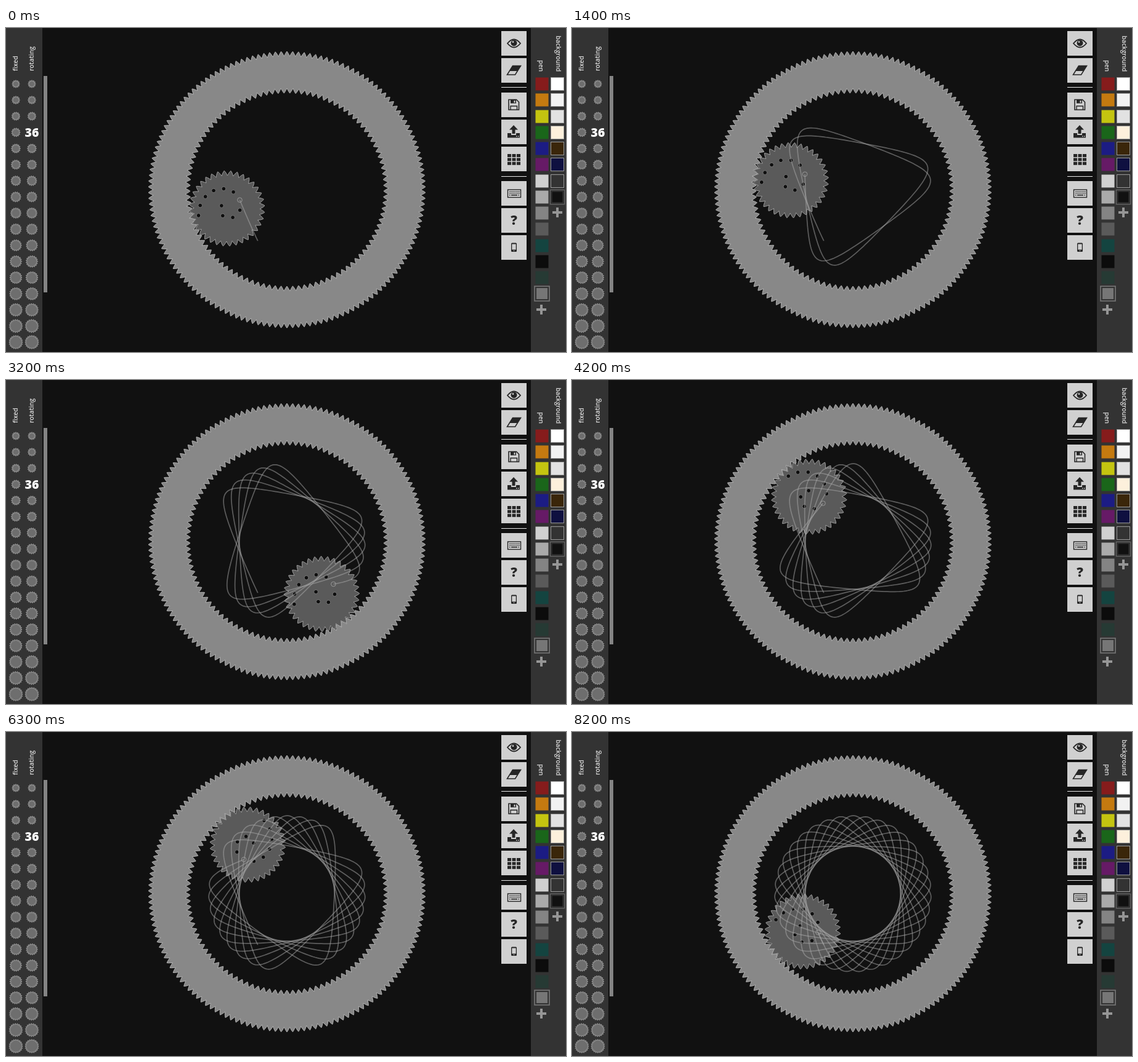
An HTML page with a canvas that plays this animation: 909 px wide and 527 px high, repeating every 8300 ms.

```html
<!DOCTYPE html>
<html>
<head>
<meta charset="utf-8">
<style>
html, body { margin: 0; height: 100%; overflow: hidden; background: #111; }
canvas { display: block; }
</style>
</head>
<body>
<canvas id="stage" width="909" height="527"></canvas>
<script>
const ctx = document.getElementById('stage').getContext('2d');
const TAU = Math.PI * 2, DEG = Math.PI / 180;
const CX = 456, CY = 263;
const OUTER_TEETH = 150, INNER_TEETH = 105, GEAR_TEETH = 36;
const ORBIT = 102, HOLE_MIN = 9.9, HOLE_STEP = 3.76, PEN_HOLE = 4;
const PEN_RADIUS = HOLE_MIN + HOLE_STEP * PEN_HOLE;
const PEAK = 218.8, START = 133.6;
const PETAL = 360 * GEAR_TEETH / INNER_TEETH;
const ROW = 26.25;
const STEP_MS = 100, STEPS = 83;

// [step, orbit angle in degrees]; the wheel's speed varies slightly
const KEYS = [[0, 162.6], [7, 543.1], [21, 1274.2], [42, 2385.8],
              [54, 3000.2], [73, 3995], [82, 4463]];

function orbitAngle(step) {
  const i = KEYS.findIndex(k => k[0] >= step);
  if (i === 0) return KEYS[0][1];
  const [s0, a0] = KEYS[i - 1], [s1, a1] = KEYS[i];
  return a0 + (a1 - a0) * (step - s0) / (s1 - s0);
}

const spin = angle => angle - (angle - PEAK) * INNER_TEETH / GEAR_TEETH;

function polar(x, y, r, angle) {
  return [x + r * Math.cos(angle), y + r * Math.sin(angle)];
}
const gearCenter = angle => polar(CX, CY, ORBIT, angle * DEG);
const penPoint = angle => polar(...gearCenter(angle), PEN_RADIUS, spin(angle) * DEG);

function rect(x, y, w, h, color) {
  ctx.fillStyle = color;
  ctx.fillRect(x, y, w, h);
}

function frame(x, y, w, h, color, width = 1) {
  ctx.strokeStyle = color;
  ctx.lineWidth = width;
  ctx.strokeRect(x, y, w, h);
}

function shape(d, fill, stroke, width = 1) {
  const path = new Path2D(d);
  if (fill) { ctx.fillStyle = fill; ctx.fill(path, 'evenodd'); }
  if (stroke) { ctx.strokeStyle = stroke; ctx.lineWidth = width; ctx.stroke(path); }
}

function disc(x, y, r, fill, stroke) {
  ctx.beginPath();
  ctx.arc(x, y, r, 0, TAU);
  if (fill) { ctx.fillStyle = fill; ctx.fill(); }
  if (stroke) { ctx.strokeStyle = stroke; ctx.lineWidth = 1; ctx.stroke(); }
}

function toothedPath(x, y, valley, tip, teeth, rotation) {
  const samples = 8, path = new Path2D();
  for (let i = 0; i < teeth * samples; i++) {
    const u = Math.abs((i % samples) / samples * 2 - 1);
    const r = tip + (valley - tip) * u ** 1.2;
    path.lineTo(...polar(x, y, r, rotation + (i / samples - 0.5) * TAU / teeth));
  }
  path.closePath();
  return path;
}

function paint(path, fill, stroke, width) {
  ctx.fillStyle = fill;
  ctx.fill(path, 'evenodd');
  ctx.strokeStyle = stroke;
  ctx.lineWidth = width;
  ctx.stroke(path);
}

function text(label, x, y, rotation, font, color, align) {
  ctx.save();
  ctx.translate(x, y);
  ctx.rotate(rotation);
  ctx.font = font + ' "Open Sans", sans-serif';
  ctx.fillStyle = color;
  ctx.textAlign = align;
  ctx.fillText(label, 0, 0);
  ctx.restore();
}

function plus(x, y) {
  rect(x - 8, y - 2, 16, 4, '#969696');
  rect(x - 2, y - 8, 4, 16, '#969696');
}

function drawGearList() {
  rect(0, 0, 59, 527, '#333');
  text('fixed', 18.5, 70, -Math.PI / 2, '600 10.4px', '#ddd', 'left');
  text('rotating', 45, 70, -Math.PI / 2, '600 10.4px', '#ddd', 'left');
  for (let row = 0; row < 17; row++) {
    for (const x of [16, 42]) {
      const y = 91 + row * ROW, r = 6.3 + row * 0.31;
      if (x === 42 && row === 3) continue;
      paint(toothedPath(x, y, r - 2.2, r, 12 + Math.floor(row / 2), 0), '#6e6e6e', '#b4b4b4', 0.8);
    }
  }
  text('36', 42, 177, 0, '800 19.5px', '#fff', 'center');
  rect(61, 78, 6, 352, '#848484');
}

function drawButtons() {
  const ink = '#262626';
  for (const y of [5, 49, 105, 149, 193, 249, 293, 337]) rect(804, y, 41, 40, '#d0d0d0');
  rect(804, 96, 41, 1, '#e8e8e8');
  rect(804, 241, 41, 1, '#e8e8e8');

  // eye
  shape('M814 25Q824.5 12 835 25Q824.5 38 814 25Z', null, ink, 1.8);
  disc(824.5, 24.5, 5, ink);
  disc(823, 22.7, 1.4, '#d0d0d0');
  // eraser
  shape('M822.5 61.5H835.5L826.5 76H813.5Z', null, ink, 1.6);
  shape('M822.5 61.5H835.5L830 70H817Z', ink);
  // save
  shape('M816 116.5H828.5L832.5 120.5V133H816Z', null, ink, 1.6);
  shape('M819 117H828V122.5H819ZM824.5 118V121.5H826.5V118Z', ink);
  shape('M819 133V127H829.5V133', null, ink, 1.4);
  // upload
  shape('M824 158L831 165.5H826.5V172H821.5V165.5H817Z', ink);
  shape('M814 171H820V174H828V171H834V178.5H814ZM828 175.5V177H829.5V175.5ZM831 175.5V177H832.5V175.5Z', ink);
  // grid
  for (let i = 0; i < 9; i++) rect(814 + i % 3 * 7.5, 205 + Math.floor(i / 3) * 6.4, 6, 5, ink);
  // keyboard
  frame(814.5, 263, 21, 12.5, ink, 1.4);
  for (let i = 0; i < 16; i++) rect(817 + i % 8 * 2.2, 265.5 + Math.floor(i / 8) * 2.7, 1.3, 1.5, ink);
  rect(817, 271, 1.5, 1.6, ink);
  rect(820, 271, 10, 1.6, ink);
  rect(831.5, 271, 1.5, 1.6, ink);

  text('?', 824.5, 320, 0, '800 21px', ink, 'center');

  // phone
  ctx.beginPath();
  ctx.roundRect(820, 349.5, 9, 14.5, 1.5);
  ctx.fillStyle = ink;
  ctx.fill();
  rect(821.3, 351.5, 6.4, 9, '#d0d0d0');
  disc(824.5, 362.2, 0.8, '#d0d0d0');
}

function drawSwatches() {
  rect(852, 0, 57, 527, '#333');
  text('pen', 865, 71, Math.PI / 2, '600 10.2px', '#ddd', 'right');
  text('background', 892.5, 71, Math.PI / 2, '600 10.2px', '#ddd', 'right');
  const pens = ['#861c1c', '#c47a10', '#c4c410', '#1a661a', '#1c1c84', '#661a66', '#d0d0d0',
                '#aaa', '#848484', '#5a5a5a', '#144440', '#0c0c0c', '#263a34', '#767676'];
  const grounds = ['#fff', '#f2f2f2', '#e2e2e2', '#fdf0dc', '#3a260a', '#0f1040', '#333', '#111'];
  const rowTop = i => Math.round(80 + i * ROW);
  pens.forEach((color, i) => {
    const y = rowTop(i), chosen = i === pens.length - 1;
    if (chosen) {
      frame(858, y - 1, 24, 24, '#777', 1.6);
      rect(861, y + 2, 18, 18, color);
    } else rect(859.5, y + 0.5, 21, 21, color);
  });
  grounds.forEach((color, i) => {
    const y = rowTop(i), chosen = i === grounds.length - 1;
    rect(884, y, 22, 22, color);
    if (chosen) {
      frame(883.5, y - 0.5, 23, 23, '#666', 1.6);
      frame(885.5, y + 1.5, 19, 19, '#333', 2);
    } else frame(884.5, y + 0.5, 21, 21, '#999');
  });
  plus(869, 458);
  plus(895, 300);
}

const TOP = 270;
const ring = toothedPath(CX, CY, 217, 225, OUTER_TEETH, TOP * DEG);
ring.addPath(toothedPath(CX, CY, 165, 157, INNER_TEETH, (TOP + 180 / INNER_TEETH) * DEG));
// a gear tooth fits the ring's valley at the top
const toothOffset = (TOP - spin(TOP)) * DEG;

function drawGear(angle) {
  const [x, y] = gearCenter(angle), rotation = spin(angle) * DEG;
  paint(toothedPath(x, y, 53.5, 61.5, GEAR_TEETH, rotation + toothOffset), '#5a5a5a', '#aaa', 0.9);

  const holes = [];
  for (let i = 0, a = 0; i < 11; i++) {
    const r = HOLE_MIN + HOLE_STEP * i;
    holes.push([r, a]);
    a -= 2 * Math.asin(8.1 / (r + HOLE_STEP / 2));
  }
  const penAngle = holes[PEN_HOLE][1];
  holes.forEach(([r, a], i) => {
    const at = polar(x, y, r, rotation + a - penAngle);
    if (i === PEN_HOLE) disc(...at, 3.8, null, '#999');
    else disc(...at, 3.4, '#0e0e0e', '#777');
  });
}

// Each petal is its own translucent stroke, so crossings brighten
function drawCurve(end) {
  ctx.strokeStyle = 'rgba(170,170,170,.5)';
  ctx.lineWidth = 1.7;
  for (let from = START; from < end; from += PETAL) {
    const to = Math.min(from + PETAL, end);
    ctx.beginPath();
    for (let i = 0; i <= 60; i++) ctx.lineTo(...penPoint(from + (to - from) * i / 60));
    ctx.stroke();
  }
}

function draw(step) {
  const angle = orbitAngle(step);
  rect(0, 0, 909, 527, '#111');
  paint(ring, '#888', '#bbb', 0.9);
  drawGear(angle);
  drawCurve(angle);
  drawGearList();
  drawButtons();
  drawSwatches();
}

let shown = -1;
function tick() {
  const step = Math.floor(performance.now() / STEP_MS) % STEPS;
  if (step !== shown) draw(shown = step);
  requestAnimationFrame(tick);
}
tick();
</script>
</body>
</html>
```
